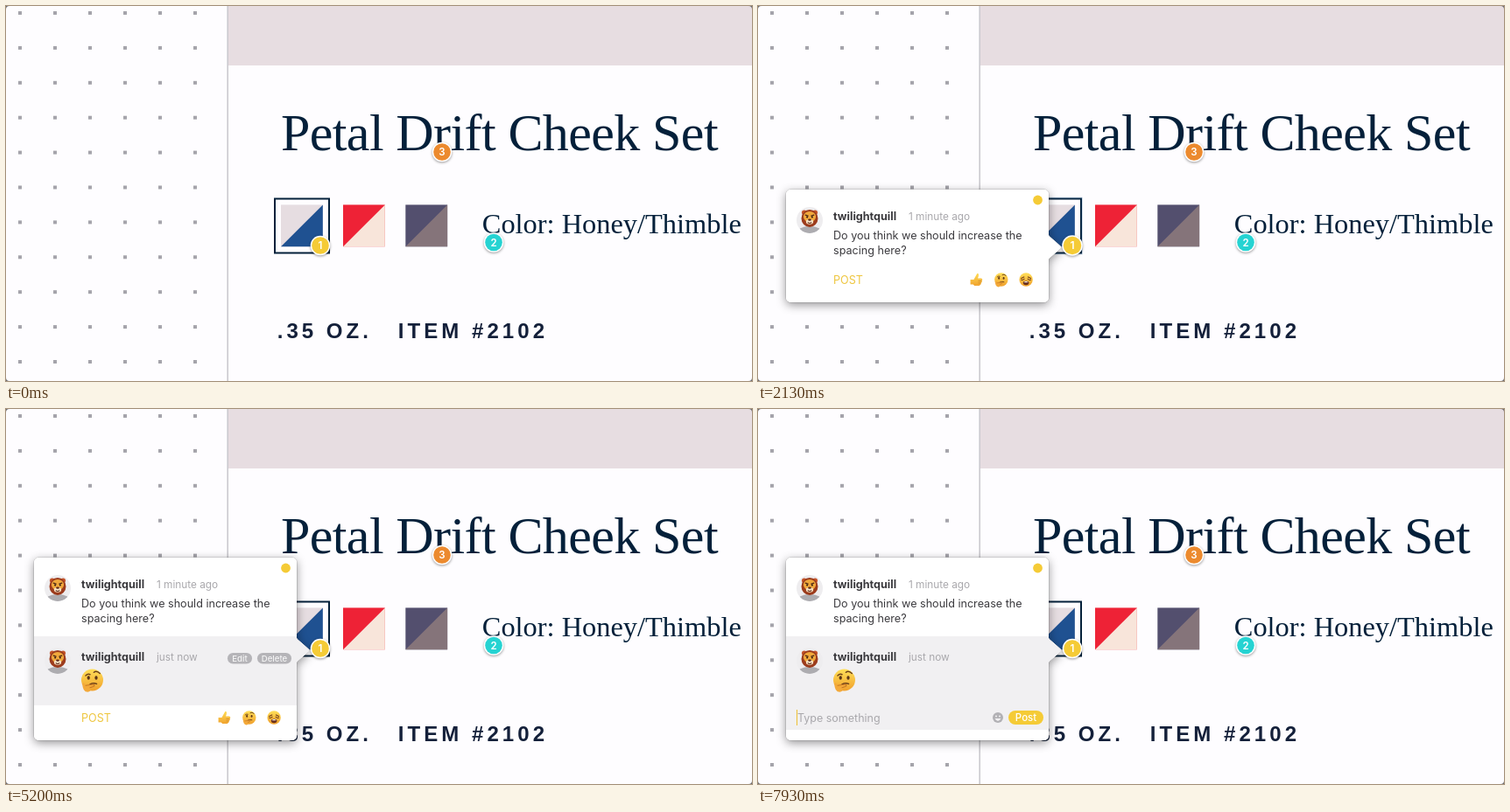
Recreate the animation shown at these times as an HTML page with a canvas. Size 852 px wide and 429 px high, loop 8 s.

```html
<!DOCTYPE html>
<html lang="en">
<head>
<meta charset="utf-8">
<title>Design comments</title>
<style>
  html, body { margin: 0; width: 100%; height: 100%; overflow: hidden; background: #fefdff; }
  canvas { display: block; width: 852px; height: 429px; }
</style>
</head>
<body>
<canvas id="stage" width="852" height="429"></canvas>
<script>
const ctx = document.getElementById('stage').getContext('2d');
const LOOP = 8000;
const UI = 'Inter, sans-serif';
const SERIF = '"Liberation Serif", serif';
const NAVY = '#04203a';
const YELLOW = '#f5cb36';
const USER = 'twilightquill';

const ramp = (t, start, length) => {
  const p = Math.min(1, Math.max(0, (t - start) / length));
  return p * p * (3 - 2 * p);
};

function text(str, x, y, font, color, spacing = 0, align = 'left') {
  ctx.font = font;
  ctx.fillStyle = color;
  ctx.letterSpacing = spacing + 'px';
  ctx.textAlign = align;
  ctx.fillText(str, x, y);
}

function rect(x, y, w, h, color) {
  ctx.fillStyle = color;
  ctx.fillRect(x, y, w, h);
}

function frame(x, y, size, color, width) {
  ctx.strokeStyle = color;
  ctx.lineWidth = width;
  ctx.strokeRect(x, y, size, size);
}

function disc(x, y, rx, color, ry = rx, angle = 0) {
  ctx.fillStyle = color;
  ctx.beginPath();
  ctx.ellipse(x, y, rx, ry, angle, 0, Math.PI * 2);
  ctx.fill();
}

function pill(x, y, w, h, color) {
  ctx.fillStyle = color;
  ctx.beginPath();
  ctx.roundRect(x, y, w, h, h / 2);
  ctx.fill();
}

function line(path, color, width) {
  ctx.strokeStyle = color;
  ctx.lineWidth = width;
  ctx.lineCap = 'round';
  ctx.stroke(new Path2D(path));
}

function shape(path, color) {
  ctx.fillStyle = color;
  ctx.fill(new Path2D(path));
}

function faded(alpha, draw) {
  if (alpha <= 0) return;
  ctx.save();
  ctx.globalAlpha *= alpha;
  draw();
  ctx.restore();
}

function placed(x, y, scale, draw) {
  ctx.save();
  ctx.translate(x, y);
  ctx.scale(scale, scale);
  draw();
  ctx.restore();
}

function shadow(color, blur, dy) {
  ctx.shadowColor = color;
  ctx.shadowBlur = blur;
  ctx.shadowOffsetY = dy;
}

// Emoji are drawn in a box from -10 to 10.
function goldFill() {
  const g = ctx.createLinearGradient(0, -10, 0, 10);
  g.addColorStop(0, '#ffdf58');
  g.addColorStop(1, '#f0a02c');
  return g;
}

function thumb() {
  shape('M-9 0H-4L1 -9Q4 -10 3 -5L2 -2H7Q10 -1 8 2Q9 4 7 5Q7 8 4 9H-3L-5 7H-9Z', goldFill());
  line('M3 2H7M3 5H6', '#cf8724', 1);
}

function thinking() {
  disc(0, 0, 10, goldFill());
  disc(-3.4, -2, 1.3, '#5b3517', 1.8);
  disc(3.6, -2, 1.3, '#5b3517', 1.8);
  line('M-6 -4Q-4 -6 -2 -5M1.5 -7Q4 -9 7 -6', '#6b401a', 1.2);
  line('M-2 4Q1 2.4 4 3.5', '#6b401a', 1.2);
  shape('M-9 3Q-7 2 -6 5L1 4Q3 5 1 6L-2 7Q0 10 -4 11Q-9 11 -9 3Z', '#f3a93a');
  line('M-6 5L1 4Q3 5 1 6L-2 7', '#c87822', 0.9);
}

function weary() {
  disc(0, 0, 10, goldFill());
  line('M-7 -2L-3 -4M7 -2L3 -4', '#74401b', 1.5);
  line('M-7 0Q-5 1.5 -2.5 -1M7 0Q5 1.5 2.5 -1', '#74401b', 1.4);
  disc(0, 5, 4.3, '#6a301c', 3);
  shape('M-3 3.5Q0 2 3 3.5V4.2H-3Z', '#fff');
}

function avatar(x, y) {
  ctx.save();
  disc(x, y, 15, '#eeedef');
  ctx.beginPath();
  ctx.arc(x, y, 15, 0, Math.PI * 2);
  ctx.clip();
  disc(x, y + 15, 15, '#adacb0', 8);
  ctx.restore();
  placed(x, y - 2, 0.95, () => {
    disc(-6.5, -7, 3, '#c4552a');
    disc(6.5, -7, 3, '#c4552a');
    disc(0, 0, 10, '#9c3c1d', 10.5);
    disc(0, -2, 7.5, '#f0a83c', 6.5);
    line('M-5 -4L-2 -3M5 -4L2 -3', '#4a2414', 1.4);
    disc(-3, -1.5, 1.1, '#2d1a12');
    disc(3, -1.5, 1.1, '#2d1a12');
    disc(0, 4, 4.4, '#f7e3c4', 3);
    disc(0, 1.7, 2, '#5a2618', 1.3);
    line('M-2 5Q0 6.5 2 5', '#5a2618', 1.1);
  });
}

function swatch(x, top, bottom) {
  rect(x, 227.4, 47.8, 47.8, top);
  shape(`M${x + 47.8} 227.4v47.8H${x}Z`, bottom);
}

function pin(x, y, label, color, scale = 1) {
  placed(x, y, scale, () => {
    ctx.save();
    shadow('rgba(0,0,0,.4)', 3, 1);
    disc(0, 0, 11.3, '#fff');
    ctx.restore();
    disc(0, 0, 9.8, color);
    text(label, 0, 4.2, `600 11.5px ${UI}`, '#fff', 0, 'center');
  });
}

function page(highlight) {
  rect(0, 0, 852, 429, '#fefdff');
  for (let x = 16; x < 240; x += 40)
    for (let y = 8; y < 429; y += 39.9) rect(x - 2, y - 2, 4, 4, '#a5a4ab');
  rect(252.4, 0, 1.6, 429, '#cbcacf');
  rect(254, 0, 598, 68, '#e7dde1');

  text('Petal Drift Cheek Set', 314, 165, `60px ${SERIF}`, NAVY, -0.6);
  swatch(314, '#e6dde1', '#1f5191');
  swatch(385, '#ee2236', '#f8e5da');
  swatch(456.3, '#534f6e', '#85747a');
  frame(307, 220.5, 62, NAVY, 2);
  faded(highlight, () => frame(306, 219.5, 64, '#2a6499', 1.5));
  text('Color: Honey/Thimble', 543.8, 260, `32.4px ${SERIF}`, NAVY);
  const bold = 'bold 24px "Liberation Sans", sans-serif';
  text('.35 OZ.', 309.8, 380, bold, '#14203a', 4);
  text('ITEM #2102', 447.8, 380, bold, '#14203a', 4.05);
}

function windowCorners() {
  const edge = new Path2D();
  edge.rect(0, 0, 852, 429);
  edge.roundRect(0, 0, 852, 429, 4);
  ctx.fillStyle = '#6b6a6e';
  ctx.fill(edge, 'evenodd');
}

function heading(y, when) {
  avatar(59, y);
  text(USER, 86, y, `bold 12.6px ${UI}`, '#39383c');
  text(when, 172, y, `11.8px ${UI}`, '#a9a8ac');
}

function quickReplies(y, hover, quick) {
  faded(1 - quick, () => text('POST', 86, y + 5, `12.6px ${UI}`, '#eec63f'));
  faded(quick, () => text('Quick-reply', 162, y + 5, `12px ${UI}`, '#a9a8ac'));
  faded(hover, () => disc(278, y, 12, '#d2cfd2'));
  [thumb, thinking, weary].forEach((face, i) => placed(249.5 + i * 28.3, y, 0.77, face));
}

function composer(y) {
  text('Type something', 45, y + 5, `12.5px ${UI}`, '#a9a8ac');
  rect(44, y - 9, 1, 18, '#eebf32');
  disc(274, y, 6, '#b2b1b5');
  disc(272, y - 1.5, 1, '#f1f0f2');
  disc(276, y - 1.5, 1, '#f1f0f2');
  shape(`M270.5 ${y + 1}H277.5Q274 ${y + 7} 270.5 ${y + 1}Z`, '#f1f0f2');
  pill(286, y - 8, 40, 16, YELLOW);
  text('Post', 306, y + 4, `500 11.5px ${UI}`, '#fff', 0, 'center');
}

function action(label, x, w) {
  pill(x, 279, w, 12.5, '#adacb0');
  text(label, x + w / 2, 288.8, `500 9.6px ${UI}`, '#fff', 0, 'center');
}

function panel(t) {
  const grow = ramp(t, 4900, 260);
  const compose = ramp(t, 7280, 130);
  const quick = ramp(t, 3200, 180) * (1 - ramp(t, 4960, 140));
  const hover = ramp(t, 3700, 100) * (1 - ramp(t, 4960, 100));
  const top = 210 - 40 * grow;
  const bottom = 339 + 40 * grow;

  const outline = new Path2D();
  outline.roundRect(32, top, 300, bottom - top, 5);
  outline.addPath(new Path2D('M331 261Q333 264 337 267L346 275Q347 276 346 277L337 285Q333 288 331 291Z'));
  ctx.save();
  shadow('rgba(0,0,0,.42)', 11, 3);
  ctx.fillStyle = '#fff';
  ctx.fill(outline);
  ctx.restore();
  ctx.strokeStyle = 'rgba(0,0,0,.2)';
  ctx.lineWidth = 1;
  ctx.stroke(outline);
  ctx.fillStyle = '#fff';
  ctx.fill(outline);

  ctx.save();
  ctx.clip(outline);
  faded(grow, () => {
    rect(32, 260, 316, 79 + 28 * compose, '#f1f0f2');
    heading(288, 'just now');
    placed(98.5, 310, 1.25, thinking);
    faded(ramp(t, 5100, 130) * (1 - ramp(t, 6000, 130)), () => {
      action('Edit', 253, 28);
      action('Delete', 287, 39);
    });
  });
  disc(319.5, top + 12, 5.4, YELLOW);
  heading(top + 35, '1 minute ago');
  const body = `12.6px ${UI}`;
  text('Do you think we should increase the', 86, top + 57, body, '#3b3a3e');
  text('spacing here?', 86, top + 74, body, '#3b3a3e');
  faded(1 - compose, () => quickReplies(bottom - 26, hover, quick));
  faded(compose, () => composer(bottom - 26));
  ctx.restore();
}

function render() {
  const t = performance.now() % LOOP;
  const open = ramp(t, 1600, 150);
  const swell = ramp(t, 1300, 100) * (1 - ramp(t, 2050, 120));
  page(swell);
  faded(open, () => panel(t));
  pin(498, 167, '3', '#ec8a2e');
  pin(557, 270.5, '2', '#26d3d2');
  pin(359, 274, '1', YELLOW, 1 + 0.18 * swell);
  windowCorners();
  requestAnimationFrame(render);
}

render();
</script>
</body>
</html>
```
